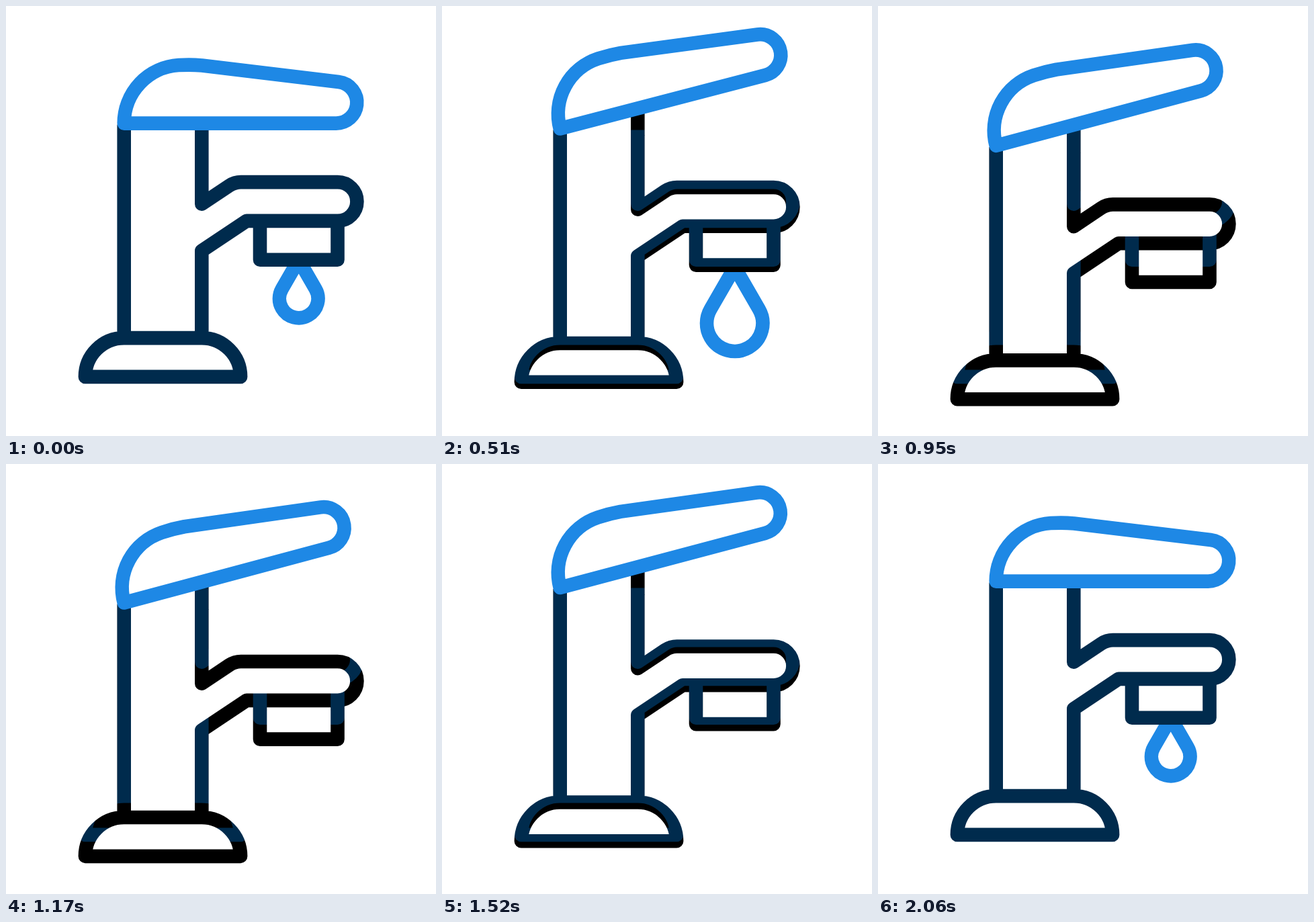
Recreate the animation shown at these times as an HTML page with a canvas. Size 640x640 px, loop 2130 ms.

```html
<!DOCTYPE html>
<html lang="en">
<head>
<meta charset="utf-8">
<title>Dripping tap</title>
<style>
html, body { margin: 0; width: 100%; height: 100%; overflow: hidden; background: #fff; }
canvas { display: block; width: 640px; height: 640px; }
</style>
</head>
<body>
<canvas id="stage" width="640" height="640"></canvas>
<script>
const ctx = document.getElementById('stage').getContext('2d');
const NAVY = '#002b4d', BLUE = '#1e88e5', BLACK = '#000';
const LOOP = 2130, SEGMENT = 570;
const LEFT = 175.7, RIGHT = 291.3, SEAT = 174.6, NOZZLE = 377.7;

// Frames run at uneven delays, sixteen to a segment.
const offset = k => 30 * k + (k > 3 ? 10 : 0) + (k > 9 ? 40 : 0);

function frameAt(ms) {
  const t = ms + 440, n = Math.floor(t / SEGMENT), u = t % SEGMENT;
  let k = 15;
  while (k > 0 && offset(k) > u) k--;
  return 16 * n + k - 13;
}

// cubic-bezier(.5, 0, .5, 1) between frames a and b
function ease(s, a, b) {
  const x = (s - a) / (b - a);
  if (x <= 0) return 0;
  if (x >= 1) return 1;
  let lo = 0, hi = 1;
  for (let i = 0; i < 24; i++) {
    const m = (lo + hi) / 2;
    if (1.5 * m * (1 - m) + m * m * m < x) lo = m; else hi = m;
  }
  return lo * lo * (3 - 2 * lo);
}

const body = new Path2D();
// column
body.moveTo(LEFT, SEAT + 2);
body.lineTo(LEFT, 494.1);
// spout
body.moveTo(RIGHT, 184.6);
body.lineTo(RIGHT, 294.8);
body.lineTo(332.2, 267.5);
body.quadraticCurveTo(340.3, 262.1, 349.5, 262.1);
body.lineTo(493.5, 262.1);
body.arc(493.5, 291, 28.9, -Math.PI / 2, Math.PI / 2);
body.lineTo(358, 319.9);
body.lineTo(RIGHT, 364.4);
body.lineTo(RIGHT, 494.1);
// nozzle
body.moveTo(378, 319.9);
body.lineTo(378, NOZZLE);
body.lineTo(493.5, NOZZLE);
body.lineTo(493.5, 319.9);
// foot
body.moveTo(117.9, 551.9);
body.arc(LEFT, 551.9, 57.8, Math.PI, Math.PI * 1.5);
body.arc(RIGHT, 551.9, 57.8, Math.PI * 1.5, Math.PI * 2);
body.closePath();

const neck = new Path2D();
neck.moveTo(RIGHT, 140);
neck.lineTo(RIGHT, 185);

// Handle, relative to its hinge
const handle = new Path2D();
handle.moveTo(0, 0);
handle.arc(86.7, 0, 86.7, Math.PI, Math.PI * 1.48);
handle.quadraticCurveTo(99, -87.6, 116, -86.2);
handle.arc(315.7, -30.9, 30.9, -1.451, Math.PI / 2);
handle.closePath();

function stroke(path, color, dy) {
  ctx.save();
  ctx.translate(0, dy);
  ctx.strokeStyle = color;
  ctx.stroke(path);
  ctx.restore();
}

function drawTap(dy) {
  stroke(neck, BLACK, dy);
  if (dy < 0.1) {
    stroke(body, NAVY, 0);
    return;
  }
  stroke(body, BLACK, dy);
  // navy stays only where the tap overlaps its resting place
  ctx.globalCompositeOperation = 'source-atop';
  stroke(body, NAVY, 0);
  ctx.globalCompositeOperation = 'source-over';
}

function drawHandle(dy, deg) {
  ctx.save();
  ctx.translate(LEFT, SEAT + dy);
  ctx.rotate(-deg * Math.PI / 180);
  ctx.fillStyle = '#fff';
  ctx.fill(handle);
  ctx.strokeStyle = BLUE;
  ctx.stroke(handle);
  ctx.restore();
}

function drawDrop(s, dy) {
  let r, tip;
  if (s < 30) {
    r = 28.8 + 12.9 * ease(s, 1, 14);
    tip = 377.9 + 1.29 * Math.max(0, s - 11.1) ** 2;
  } else {
    const p = ease(s, 30, 54);
    r = 28.8 * p;
    tip = 211.9 + 166 * p;
  }
  ctx.save();
  ctx.globalCompositeOperation = 'destination-over';
  ctx.beginPath();
  ctx.rect(0, NOZZLE + dy, 640, 640);
  ctx.clip();
  ctx.beginPath();
  ctx.moveTo(435.7, tip);
  ctx.arc(435.7, tip + 2 * r, r, -Math.PI / 6, Math.PI * 7 / 6);
  ctx.closePath();
  ctx.strokeStyle = BLUE;
  ctx.stroke();
  ctx.restore();
}

function draw(ms) {
  const s = frameAt(ms % LOOP);
  const dy = 33.3 * (ease(s, 6.8, 27) - ease(s, 29.4, 51.5));
  const deg = 15 * (ease(s, 1, 16) - ease(s, 41.8, 57.6));
  ctx.clearRect(0, 0, 640, 640);
  ctx.lineWidth = 20.6;
  ctx.lineJoin = 'round';
  drawTap(dy);
  drawHandle(dy, deg);
  drawDrop(s, dy);
}

let start;
function tick(now) {
  if (start === undefined) start = now;
  draw(now - start);
  requestAnimationFrame(tick);
}
draw(0);
requestAnimationFrame(tick);
</script>
</body>
</html>
```
